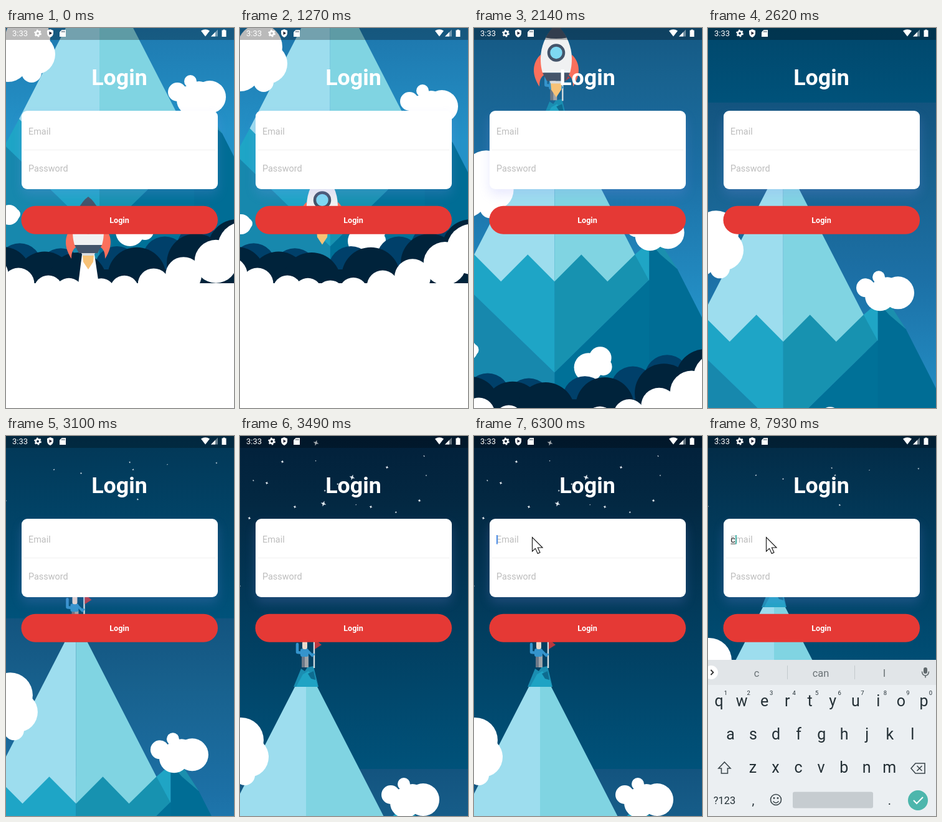
An HTML page that plays this animation: 366 by 606 pixels, repeating every 8000 ms.

```html
<!DOCTYPE html>
<html lang="en">
<head>
<meta charset="utf-8">
<title>Login</title>
<style>
  html, body { margin: 0; width: 100%; height: 100%; overflow: hidden; background: #fff; }
  #stage { position: relative; width: 366px; height: 606px; overflow: hidden; }
  svg { position: absolute; left: 0; top: 0; width: 366px; height: 606px; font-family: Roboto, sans-serif; }
  .card { position: absolute; left: 24.5px; top: 132px; width: 315.5px; height: 125px;
    border-radius: 9px; background: #fff; box-shadow: 0 9px 18px rgba(143, 148, 251, .2); }
</style>
</head>
<body>
<div id="stage">
<svg viewBox="0 0 366 606">
  <defs>
    <linearGradient id="night" gradientUnits="userSpaceOnUse" x1="0" y1="0" x2="0" y2="531">
      <stop offset="0" stop-color="#02203a"/>
      <stop offset=".2" stop-color="#032842"/>
      <stop offset=".55" stop-color="#023c5d"/>
      <stop offset="1" stop-color="#00527a"/>
    </linearGradient>
    <linearGradient id="day" gradientUnits="userSpaceOnUse" x1="0" y1="531" x2="0" y2="1031">
      <stop offset="0" stop-color="#13547f"/>
      <stop offset=".24" stop-color="#18628f"/>
      <stop offset=".56" stop-color="#1c70a6"/>
      <stop offset="1" stop-color="#2492c8"/>
    </linearGradient>
  </defs>
  <g id="scene">
    <g id="sky">
      <rect y="500" width="366" height="1400" fill="url(#day)"/>
      <rect y="-700" width="366" height="1231" fill="url(#night)"/>
    </g>
    <path id="stars" fill="#e6eef4"/>
    <g id="peak">
      <path fill="#1788ad" d="M-152 42L0 188V700H-490z"/>
      <path fill="#007198" d="M152 40L0 188V700H490z"/>
      <path fill="#1ea5c6" d="M0 0H-129L-152 42L0 188z"/>
      <path fill="#1792b0" d="M0 0H129L152 40L0 188z"/>
      <path fill="#1fa5c5" d="M129 0L152 -20V42z"/>
      <path fill="#006d95" d="M152 -20L197 23L238 103L540 700H152z"/>
      <path fill="#1b8fae" d="M152 -20L175 -11L197 23L170 0z"/>
      <path fill="#9dddee" d="M0 -215H-18L-129 0L-86 43L-43 0L0 43z"/>
      <path fill="#80d4e2" d="M0 -215H18L129 0L85 43L43 0L0 43z"/>
      <path fill="#1a8db1" d="M-20 -215L-8 -244L-2 -240L2 -246L12 -248L20 -215z"/>
      <path fill="#1fa3c4" d="M-16 -215L-5 -235L4 -240L16 -226L19 -215z"/>
      <path fill="#0e6c90" d="M3 -236L12 -240L15 -226L8 -228z"/>
      <path stroke="#d5dde0" stroke-width="2.4" d="M13 -300V-245"/>
      <path fill="#b8383f" d="M14 -291L25 -282L14 -275z"/>
      <path fill="#6c7888" d="M-7 -265H-1V-246H-7z"/>
      <path fill="#9fa4a9" d="M-2 -265H4V-246H-2z"/>
      <path fill="none" stroke="#3594cc" stroke-width="4.5" stroke-linejoin="round" stroke-linecap="round" d="M-14 -283V-270L-5 -269"/>
      <rect x="-9" y="-276" width="13" height="13" rx="3" fill="#3594cc"/>
      <path fill="none" stroke="#3594cc" stroke-width="4" d="M2 -273L10 -265L13 -268"/>
      <rect x="-6" y="-288" width="8" height="13" rx="3" fill="#e9d9cc"/>
    </g>
    <g id="clouds" fill="#fff">
      <circle cx="2" cy="485" r="36"/><circle cx="14" cy="512" r="32"/>
      <circle cx="8" cy="541" r="16"/><circle cx="-30" cy="522" r="34"/>
      <circle cx="263" cy="555" r="10"/><circle cx="242" cy="572" r="15"/><circle cx="294" cy="580" r="26"/>
      <circle cx="265" cy="585" r="24"/><circle cx="277" cy="575" r="20"/>
      <circle cx="-28" cy="768" r="16"/><circle cx="-19" cy="767" r="9"/>
      <circle cx="166" cy="795" r="23"/><circle cx="185" cy="780" r="18"/><circle cx="190" cy="794" r="14"/>
    </g>
    <g id="bank">
      <g id="blue" fill="#00406a"></g>
      <g id="dark" fill="#00233b"></g>
      <rect y="385" width="366" height="600" fill="#00233b"/>
    </g>
    <path id="trail" fill="#fff" d="M-10 361H10L17 408H-16z"/>
    <g id="rocket">
      <path fill="#f7c277" d="M-9 93H9L8 104L0 116L-8 104z"/>
      <path fill="#fb705c" d="M-25 48C-36 58 -42 76 -27 99C-27 89 -25 84 -19 80z"/>
      <path fill="#fb705c" d="M25 48C36 58 42 76 27 99C27 89 25 84 19 80z"/>
      <path fill="#f0f1f2" d="M0 1C15 12 25 33 25 54C25 64 24 70 22 77H-22C-24 70 -25 64 -25 54C-25 33 -15 12 0 1z"/>
      <path fill="#44546a" d="M0 0Q9 6 17 21Q0 24 -17 21Q-9 6 0 0z"/>
      <path fill="#44546a" d="M-22 77H22L15 90H-15z"/>
      <path fill="#d9dcdf" d="M-11 90H11L9 94H-9z"/>
      <circle cy="45" r="12" fill="#7ed8f2" stroke="#44546a" stroke-width="4.5"/>
    </g>
    <g id="smoke" fill="#fff">
      <g id="left"></g>
      <g id="right"></g>
      <rect y="407" width="366" height="700"/>
    </g>
  </g>
</svg>
<div class="card"></div>
<svg viewBox="0 0 366 606">
  <path d="M29 194.5H336" stroke="#f0f0f0"/>
  <rect x="24.5" y="283.7" width="315.5" height="45" rx="22.5" fill="#e53935"/>
  <g fill="#fff" font-weight="700" text-anchor="middle">
    <text x="182" y="90.5" font-size="35.8">Login</text>
    <text x="182" y="311" font-size="12.6">Login</text>
  </g>
  <g fill="#bdbdbd" font-size="14.4">
    <text x="36" y="170">Email</text>
    <text x="36" y="228.5">Password</text>
  </g>
  <g id="typed" fill="#333">
    <text x="36.3" y="170" font-size="14.4">c</text>
    <path d="M36.5 172H44" stroke="#333"/>
  </g>
  <rect id="caret" y="158" width="2" height="14.5"/>

  <rect width="366" height="19" fill="#000" opacity=".27"/>
  <g fill="#fff">
    <text x="10" y="13.4" font-size="13">3:33</text>
    <circle cx="51" cy="8.5" r="3.2" fill="none" stroke="#fff" stroke-width="2.6"/>
    <circle cx="51" cy="8.5" r="5" fill="none" stroke="#fff" stroke-width="1.8" stroke-dasharray="2.6 2.63"/>
    <path d="M71 2L76 4V8Q76 13 71 15Q66 13 66 8V4z"/>
    <path d="M69.5 5.5L74 8.3L69.5 11z" fill="#223"/>
    <path d="M89.5 3H96V14H86V6.5z"/>
    <path d="M89.8 4.5V7M91.8 4.5V7M93.8 4.5V7" stroke="#345" stroke-width=".9"/>
    <path d="M313 4.5Q320 0 327 4.5L320 13.5z"/>
    <path d="M340 2.5V13.5H329z" opacity=".4"/>
    <path d="M336 6.5V13.5H329z"/>
    <path d="M348.5 2.5H351.5V3.5H353.5V14H346.5V3.5H348.5z"/>
  </g>

  <g id="keyboard">
    <rect y="357" width="366" height="260" fill="#ebeff2"/>
    <rect y="357" width="366" height="40" fill="#e1e5e8"/>
    <circle cx="5" cy="377" r="11" fill="#fff"/>
    <path d="M4.5 373L8.5 377L4.5 381" fill="none" stroke="#333" stroke-width="1.8"/>
    <g id="hints" fill="#6a7276" font-size="16.5" text-anchor="middle">
      <path d="M127.5 366V388M235.5 366V388" stroke="#c3c9cc"/>
      <text x="78" y="383.5">c</text>
      <text x="181" y="383.5">can</text>
      <text x="283" y="383.5">I</text>
    </g>
    <rect x="346" y="369" width="6" height="10" rx="3" fill="#5f686c"/>
    <path d="M343.5 375.5Q344 382 349 382T354.5 375.5M349 382V385.5" fill="none" stroke="#5f686c" stroke-width="1.6"/>
    <g id="keys" fill="#243036" text-anchor="middle"></g>
    <g fill="none" stroke="#3c474c" stroke-width="1.6">
      <path d="M26.5 520L36 530H31.5V538H21.5V530H17z"/>
      <path d="M333 522H348V538H333L326 530zM335.5 526L343.5 534M343.5 526L335.5 534"/>
      <circle cx="109" cy="580" r="8.5"/>
      <path d="M104.5 582.5Q109 587.5 113.5 582.5"/>
    </g>
    <g fill="#3c474c"><circle cx="106" cy="577.5" r="1.4"/><circle cx="112" cy="577.5" r="1.4"/></g>
    <rect x="136" y="567.5" width="129" height="26" rx="3" fill="#c6ccd0"/>
    <circle cx="337" cy="581" r="16" fill="#4db6ac"/>
    <path d="M330 581L335 586L345 576" fill="none" stroke="#fff" stroke-width="2"/>
  </g>
  <path id="cursor" fill="#fff" stroke="#111" stroke-width="1.1" d="M.5 .5V23L5.5 18.3L9.3 26.5L13 24.8L9.4 17H17z"/>
</svg>
</div>
<script>
const $ = id => document.getElementById(id);

// Round hills whose tops follow a parabola with its valley at (mid, base)
function hills(id, xs, mid, base, bend, size, grow = 0) {
  $(id).innerHTML = xs.map(x => {
    const rise = bend * (x - mid) ** 2, r = size + grow * rise;
    return `<circle cx="${x}" cy="${base - rise + r}" r="${r}"/>`;
  }).join('');
}
hills('blue', [22, 88, 178, 255, 310], 115, 352, .001, 36);
hills('dark', [-6, 62, 115, 210, 305, 371], 105, 358, .00075, 47);
hills('left', [-25, 20, 68, 101], 130, 400, .00145, 22, .2);
hills('right', [153, 190, 237, 285, 337, 380], 130, 400, .00145, 22, .2);

// Bright stars by place, faint ones scattered
let seed = 7;
const random = () => (seed = seed * 16807 % 2147483647) / 2147483647;
const bright = [[122, 11], [180, 66], [134, 108], [68, 41], [236, 50], [43, 75], [88, 113], [15, 131], [210, 113], [288, 103]];
function star(x, y, r) {
  const points = Array.from({ length: 8 }, (_, i) => {
    const a = i * Math.PI / 4 + .3, d = i % 2 ? r * .38 : r;
    return (x + d * Math.cos(a)).toFixed(1) + ' ' + (y + d * Math.sin(a)).toFixed(1);
  });
  return 'M' + points.join('L') + 'z';
}
const faint = Array.from({ length: 16 }, () => star(random() * 366, random() * 260, 1 + random()));
$('stars').setAttribute('d', bright.map(([x, y], i) => star(x, y, i < 3 ? 4.6 : 2.6)).concat(faint).join(''));

const key = (s, x, y, size = 25) => `<text x="${x}" y="${y}" font-size="${size}">${s}</text>`;
const row = (s, x, y, size) => [...s].map((c, i) => key(c, x + i * 36.55, y, size)).join('');
$('keys').innerHTML = row('qwertyuiop', 17.5, 431) + row('asdfghjkl', 36, 484) + row('zxcvbnm', 72, 537) +
  row('1234567890', 28.5, 413, 9.5) + key('?123', 26.5, 586.5, 16.5) + key(',', 72.5, 588, 20) + key('.', 291.5, 588, 20);

// Camera height over time; every layer follows it at its own rate
const path = [[0, 470], [1270, 455], [2140, 254], [2620, 157], [3490, 0]];
function height(t) {
  const i = path.findIndex(p => t < p[0] - 1);
  if (i < 0) return 0;
  const [t0, y0] = path[i - 1], [t1, y1] = path[i];
  return y0 + (y1 - y0) * (t - t0) / (t1 - t0);
}

const STEP = 79.3;
const tick = t => Math.floor((t + 10) / STEP) * STEP;
const overshoot = u => 1 + 3.9 * (u - 1) ** 3 + 2.9 * (u - 1) ** 2;
const move = (id, x, y) => $(id).setAttribute('transform', `translate(${x.toFixed(2)} ${y.toFixed(2)})`);
const show = (id, on) => $(id).setAttribute('visibility', on ? 'visible' : 'hidden');

function drawScene(t) {
  const y = height(t), p = y / 470;
  const sway = 2 * p * Math.cos(Math.PI * t / 1270);
  move('sky', 0, -871 * p ** .685);
  move('stars', 0, -892 * p);
  move('peak', 106 + 42 * p + sway, 615 - y);
  move('clouds', 32 * p + sway / 2, -y);

  const drop = 484 * Math.max(0, .968 - p);
  const squeeze = 8 * Math.sin(Math.PI * t / 2540), spread = drop * .077 - squeeze;
  move('bank', 0, drop);
  move('smoke', 0, drop);
  move('left', -spread, 0);
  move('right', spread, squeeze * .4);

  move('rocket', 132, 269 - 274 * (t / 2140) ** 3.7);
  $('trail').setAttribute('transform', `translate(132 0) scale(${Math.max(0, 1 - t / 640)} 1)`);
}

function draw(t) {
  const keys = t >= 7530, typed = t >= 7850;
  drawScene(tick(t));
  move('scene', 0, keys ? -127 : 0);

  const u = Math.min(1, Math.floor((t - 5210) / STEP + .1) / 8), b = overshoot(u);
  show('cursor', t >= 5210);
  move('cursor', 165 - 70 * b - (t >= 6060 ? 2 : 0), 257 - 96 * b);

  show('keyboard', keys);
  move('keyboard', 0, t < 7610 ? 130 : t < 7770 ? 30 : 0);
  show('hints', t >= 7930);
  show('typed', typed);
  show('caret', t >= 6300);
  $('caret').setAttribute('x', typed ? 44 : 36);
  $('caret').setAttribute('fill', keys ? '#4db6ac' : '#4f8fe8');
}

const start = performance.now();
(function loop() {
  draw((performance.now() - start) % 8000);
  requestAnimationFrame(loop);
})();
</script>
</body>
</html>
```
